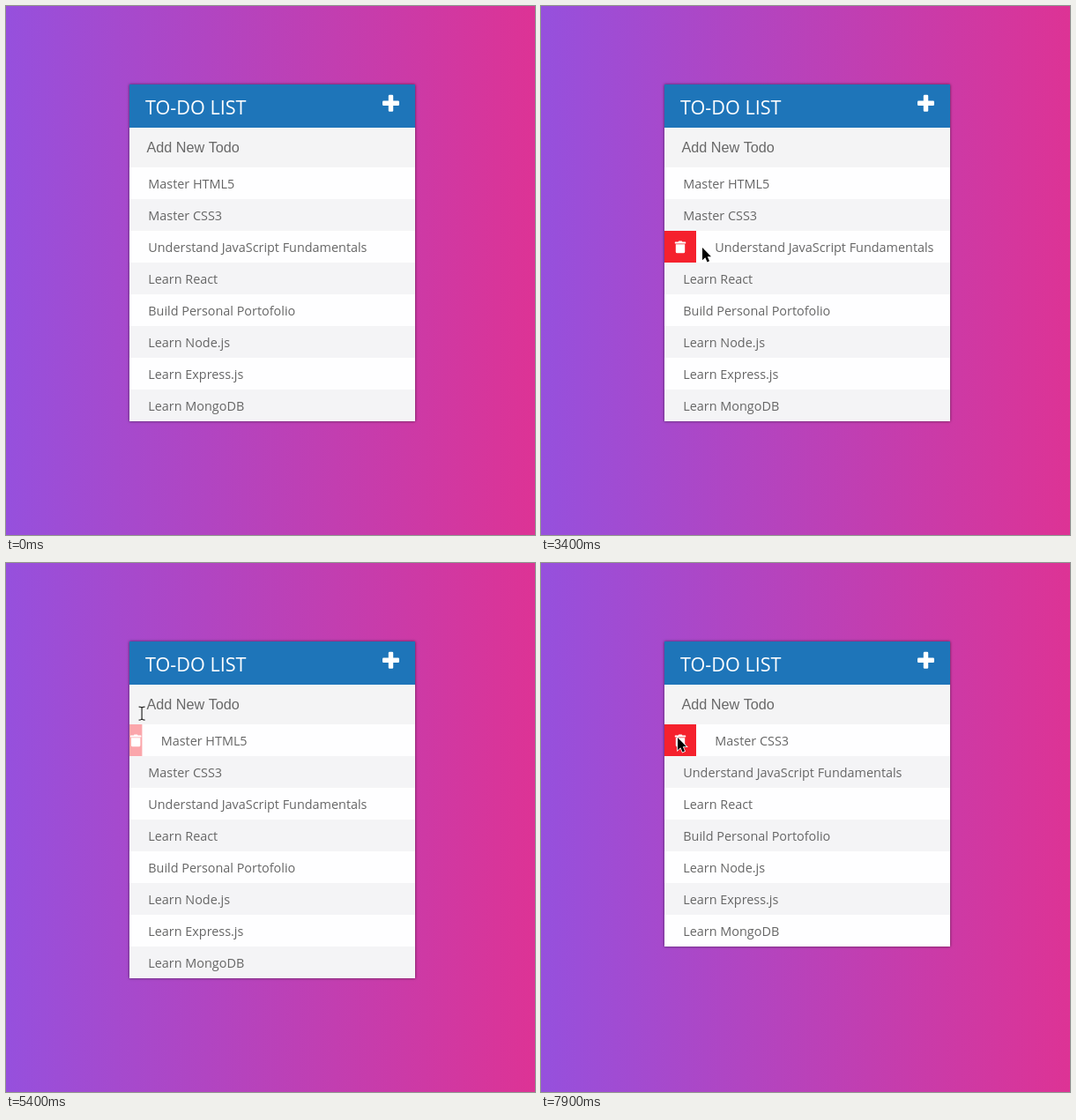
An HTML page with a canvas that plays this animation: 600x600 px, repeating every 8 s.

```html
<!DOCTYPE html>
<html lang="en">
<head>
<meta charset="utf-8">
<title>To-do list</title>
<style>
  html, body { margin: 0; height: 100%; overflow: hidden; }
  canvas { display: block; }
</style>
</head>
<body>
<canvas id="stage" width="600" height="600"></canvas>
<script>
const ctx = document.getElementById('stage').getContext('2d');
const LOOP = 8000, FRAME = 100, STEP = 10;
const LEFT = 140, WIDTH = 324, TOP = 89, INPUT_TOP = 138, LIST_TOP = 183, ROW = 36;
const REVEAL = 200, FADE = 500, REMOVED = 7630;
const TODOS = ['Master HTML5', 'Master CSS3', 'Understand JavaScript Fundamentals', 'Learn React',
  'Build Personal Portofolio', 'Learn Node.js', 'Learn Express.js', 'Learn MongoDB'];

// The pointer rests between eased moves
const ENTRY = { x: 290, y: 600 };
const MOVES = [
  { start: 1000, end: 1700, x: 209, y: 305 },
  { start: 2950, end: 3350, x: 183, y: 274 },
  { start: 3780, end: 4700, x: 155, y: 198 },
  { start: 5100, end: 5470, x: 154, y: 168 },
  { start: 5600, end: 6200, x: 155, y: 198 }
];

const clamp = v => Math.min(1, Math.max(0, v));
const ease = v => .5 - Math.cos(Math.PI * clamp(v)) / 2;

function pointerAt(t) {
  let { x, y } = ENTRY;
  for (const move of MOVES) {
    const k = ease((t - move.start) / (move.end - move.start));
    x += (move.x - x) * k;
    y += (move.y - y) * k;
  }
  return { x, y };
}

const firstTodo = t => t >= REMOVED ? 1 : 0;

// How far each row has slid open after following the pointer until time t
function revealsAt(t) {
  const open = TODOS.map(() => 0);
  for (let s = MOVES[0].start; s <= t; s += STEP) {
    const row = Math.floor((pointerAt(s).y - LIST_TOP) / ROW);
    const hovered = row < 0 ? -1 : row + firstTodo(s);
    open.forEach((v, i) => {
      open[i] = clamp(v + (i === hovered ? STEP : -STEP) / REVEAL);
    });
  }
  return open;
}

function rect(color, x, y, w, h) {
  ctx.fillStyle = color;
  ctx.fillRect(x, y, w, h);
}

function text(str, x, y, font, color) {
  ctx.font = font;
  ctx.fillStyle = color;
  ctx.fillText(str, x, y);
}

function pill(cx, cy, w, h, r) {
  ctx.beginPath();
  ctx.roundRect(cx - w / 2, cy - h / 2, w, h, r);
  ctx.fill();
}

function drawTrash(cx, cy) {
  ctx.fillStyle = '#fff';
  pill(cx, cy - 5, 12.4, 2, .6);
  pill(cx, cy - 6, 4.4, 2, .8);
  pill(cx, cy + 1.8, 10.4, 10, [0, 0, 1.5, 1.5]);
}

function drawRow(label, index, open, alpha) {
  const y = LIST_TOP + index * ROW, w = ROW * open;
  ctx.globalAlpha = alpha;
  rect(index % 2 ? '#f4f4f6' : '#fefeff', LEFT, y, WIDTH, ROW);
  if (open) {
    ctx.globalAlpha = alpha * open;
    rect('#f5212d', LEFT, y, w, ROW);
    ctx.globalAlpha = alpha;
    ctx.save();
    ctx.beginPath();
    ctx.rect(LEFT, y, w, ROW);
    ctx.clip();
    drawTrash(LEFT + w / 2, y + ROW / 2 + .5);
    ctx.restore();
  }
  text(label, LEFT + 21.3 + w, y + 23.7, '14.4px "Open Sans", sans-serif', '#666');
  ctx.globalAlpha = 1;
}

const ARROW = new Path2D('M0 0V14.2L3.3 11.2L5.6 16.4L8 15.3L5.8 10.3H10Z');
const BEAM = new Path2D('M-3.5-7.5Q0-7.5 0-6Q0-7.5 3.5-7.5M0-6V6M-3.5 7.5Q0 7.5 0 6Q0 7.5 3.5 7.5');

function outline(path, color, width) {
  ctx.strokeStyle = color;
  ctx.lineWidth = width;
  ctx.stroke(path);
}

function drawPointer({ x, y }) {
  ctx.save();
  ctx.translate(x, y);
  if (y > INPUT_TOP && y < LIST_TOP) {
    outline(BEAM, '#fff', 2.6);
    outline(BEAM, '#222', 1.2);
  } else {
    outline(ARROW, '#fff', 1.6);
    ctx.fillStyle = '#000';
    ctx.fill(ARROW);
  }
  ctx.restore();
}

const backdrop = ctx.createLinearGradient(0, 0, 600, 0);
backdrop.addColorStop(0, '#9650dd');
backdrop.addColorStop(1, '#dd3395');

function draw(t) {
  const first = firstTodo(t), open = revealsAt(t);
  rect(backdrop, 0, 0, 600, 600);

  ctx.shadowColor = 'rgba(0,0,0,.6)';
  ctx.shadowBlur = 3;
  rect('#f7f7f7', LEFT, TOP, WIDTH, LIST_TOP - TOP + (TODOS.length - first) * ROW);
  ctx.shadowColor = 'transparent';

  rect('#1e75b9', LEFT, TOP, WIDTH, INPUT_TOP - TOP);
  text('TO-DO LIST', 158, 122.5, '21.6px "Open Sans", sans-serif', '#fff');
  pill(436.5, 110.3, 19, 5.4, 1.2);
  pill(436.5, 110.3, 5.4, 19, 1.2);

  rect('#f4f4f5', LEFT, INPUT_TOP, WIDTH, LIST_TOP - INPUT_TOP);
  text('Add New Todo', 159.5, 165.5, '16.2px "Liberation Sans", Arial, sans-serif', '#686868');

  const fading = 1 - ease((t - REMOVED + FADE) / FADE);
  TODOS.forEach((label, i) => {
    if (i >= first) drawRow(label, i - first, open[i], i ? 1 : fading);
  });
  if (t >= MOVES[0].start) drawPointer(pointerAt(t));
}

function tick() {
  const t = performance.now() % LOOP;
  draw(Math.floor(t / FRAME) * FRAME);
  requestAnimationFrame(tick);
}
tick();
</script>
</body>
</html>
```
